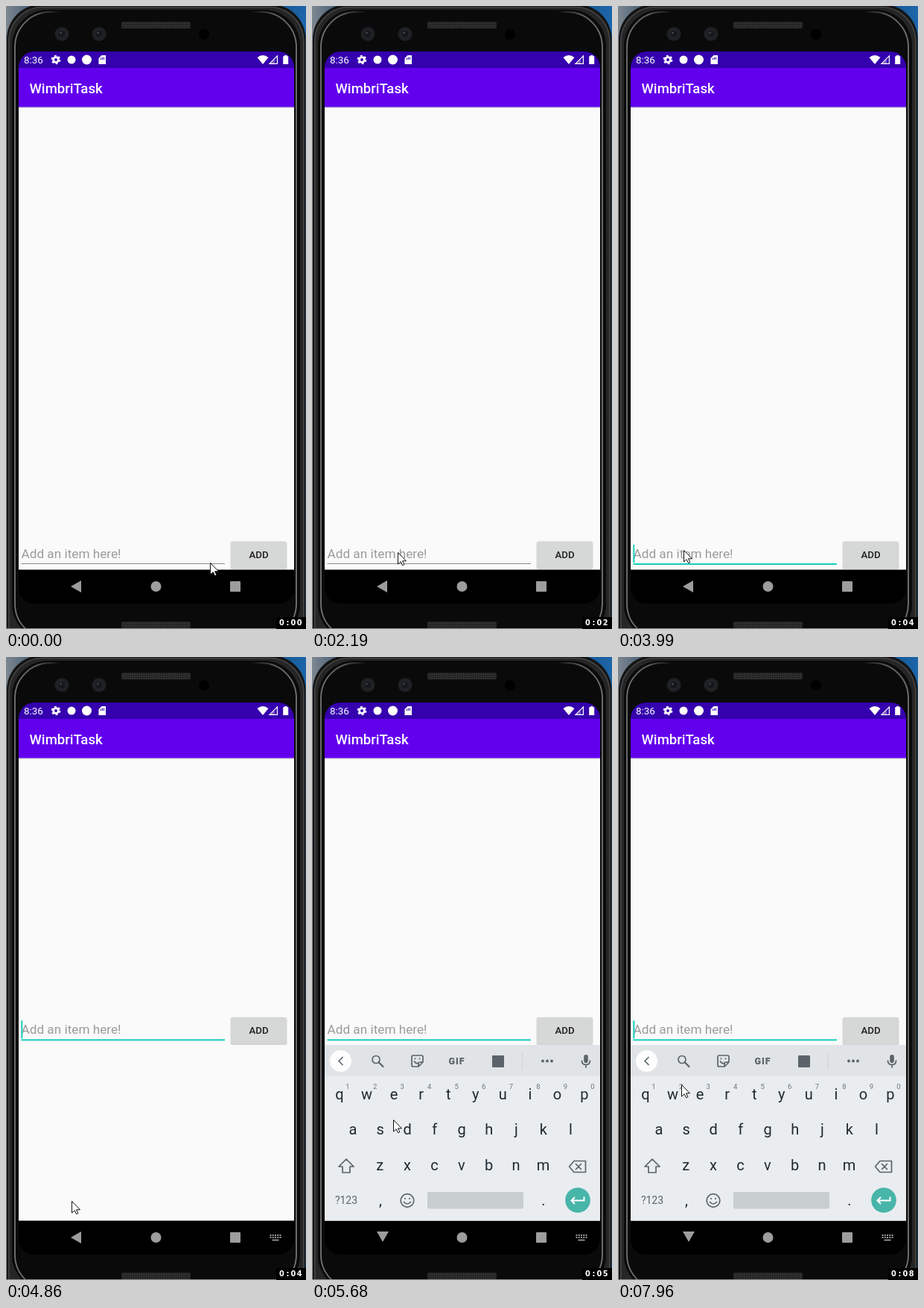
Write an HTML page that moves like this. It is 403 by 835 pixels and loops after 8 s.

```html
<!DOCTYPE html>
<html lang="en">
<head>
<meta charset="utf-8">
<title>Task list demo</title>
<style>
  html, body { margin: 0; width: 100%; height: 100%; overflow: hidden; background: #111; }
  svg { display: block; width: 100%; height: 100%; }
  text { font-family: Roboto, sans-serif; white-space: pre; }
  .mid { text-anchor: middle; }
  .line { fill: none; stroke: #5b6469; stroke-width: 1.7; stroke-linecap: round; stroke-linejoin: round; }
</style>
</head>
<body>
<svg viewBox="0 0 403 835">
  <defs>
    <linearGradient id="desk"><stop offset="0" stop-color="#7d8790"/><stop offset=".08" stop-color="#4a6078"/><stop offset=".9" stop-color="#17558f"/><stop offset="1" stop-color="#1d66aa"/></linearGradient>
    <linearGradient id="shine"><stop offset="0" stop-color="#747474"/><stop offset=".08" stop-color="#5a5a5a"/><stop offset=".16" stop-color="#0a0a0a"/><stop offset=".84" stop-color="#0a0a0a"/><stop offset=".92" stop-color="#5a5a5a"/><stop offset="1" stop-color="#747474"/></linearGradient>
    <pattern id="mesh" width="3" height="3" patternUnits="userSpaceOnUse"><rect width="3" height="3" fill="#303030"/><rect width="1.5" height="1.5" fill="#161616"/></pattern>
    <clipPath id="glass"><rect x="17" y="61" width="370" height="740" rx="21"/></clipPath>
  </defs>

  <!-- Phone body -->
  <rect width="403" height="835" fill="url(#desk)"/>
  <rect x="1" y="-2" width="401.500" height="900" rx="46" fill="#141414"/>
  <rect x="3.800" y="1.500" width="396" height="895" rx="46" fill="#262626" stroke="#464646" stroke-width="1.600"/>
  <rect x="8" y="5" width="387" height="845" rx="48" fill="#0a0a0a"/>
  <rect x="12" y="8" width="378" height="840" rx="47" fill="#0a0a0a" stroke="url(#shine)" stroke-width="1.800"/>
  <path d="M0 834.500h403" stroke="#8c8c8c"/>
  <rect x="155" y="21" width="93" height="9" rx="2" fill="url(#mesh)"/>
  <rect x="155" y="825" width="93" height="9" rx="2" fill="url(#mesh)"/>
  <g id="lenses"></g>
  <circle cx="266" cy="38" r="7" fill="#000"/>

  <!-- Screen -->
  <g clip-path="url(#glass)">
    <rect x="17" y="61" width="370" height="740"/>
    <rect x="17" y="61" width="370" height="22" fill="#3500ae"/>
    <rect x="17" y="83" width="370" height="53" fill="#6200ee"/>
    <rect x="17" y="135.500" width="370" height="620" fill="#fafafa"/>
    <path d="M17 136.300h370" stroke="#000" stroke-width="1.400" opacity=".12"/>
  </g>
  <g fill="#fff">
    <text x="24" y="77" font-size="13.4">8:36</text>
    <circle cx="67" cy="72" r="3.4" fill="none" stroke="#fff" stroke-width="2.8"/>
    <circle cx="67" cy="72" r="5.4" fill="none" stroke="#fff" stroke-width="1.8" stroke-dasharray="2.83 2.83"/>
    <circle cx="88" cy="72" r="5.5"/>
    <circle cx="108.500" cy="72" r="6.500"/>
    <path d="M128.500 66H134v12h-9.500V70z"/>
    <path d="M127.500 69.500v2.500M129.500 68.500v3.500M131.500 68.500v3.500" stroke="#3500ae"/>
    <path d="M337.500 69q7.500-6 15 0L345 78z"/>
    <path d="M364.400 66.900V77.400H354z" fill="none" stroke="#fff" stroke-width="1.2"/>
    <path d="M361 71v7h-6.500z" opacity=".35"/>
    <path d="M374 66h3.500v1.200h1.700V78h-7V67.200h1.800z"/>
    <text x="31.500" y="117" font-size="18.600" font-weight="500">WimbriTask</text>
  </g>

  <!-- Entry row -->
  <g id="entry">
    <text x="20.500" y="740" font-size="17.200" fill="#9b9b9b">Add an item here!</text>
    <rect id="rule" x="20.500" y="747" width="273.500"/>
    <rect id="caret" x="20.300" y="722" width="2" height="24" fill="#18cdbb"/>
    <rect x="301.500" y="718.500" width="76" height="36.200" rx="2" fill="#c4c4c4" opacity=".7"/>
    <rect x="302" y="717.500" width="75" height="36" rx="2" fill="#d6d7d7"/>
    <text class="mid" x="339.500" y="740" font-size="13.300" font-weight="500" fill="#202020">ADD</text>
  </g>

  <!-- Keyboard -->
  <g id="board">
    <rect x="17" y="520" width="370" height="235.500" fill="#e9edf0"/>
    <rect x="17" y="520" width="370" height="42" fill="#e0e4e7"/>
    <circle cx="38.500" cy="541.500" r="14.500" fill="#fdfdfd"/>
    <g class="line">
      <path d="M41 536.500l-5 5 5 5"/>
      <circle cx="86" cy="539.500" r="5"/><path d="M90 543.500l5.500 5.500" stroke-width="2.200"/>
      <path d="M136 534h11q2 0 2 2v7l-6 6h-7q-2 0-2-2v-11q0-2 2-2zM148.500 543h-3.500q-2 0-2 2v3.500M137.500 542q2 3.500 5 2.500M138.500 538v.6M144.500 538v.6"/>
      <path d="M282.500 531v21" stroke="#cdd2d5" stroke-width="1"/>
      <path d="M362.500 541q0 5.500 5.500 5.500t5.500-5.500M368 547v3"/>
      <path d="M46 673l-10 10h5v8h10v-8h5z"/>
      <path d="M352 675.500h15.500v15H352l-6.500-7.500zM354.500 679.500l7 7M361.500 679.500l-7 7"/>
      <circle cx="128" cy="728.500" r="8.800"/><path d="M123.500 730.500q4.500 5 9 0M125 725.500v.7M131 725.500v.7"/>
    </g>
    <g fill="#5b6469">
      <rect x="365.200" y="533" width="5.600" height="11" rx="2.800"/>
      <rect x="242" y="534" width="16" height="16" rx="1"/>
      <circle cx="310" cy="541.500" r="1.900"/><circle cx="316" cy="541.500" r="1.900"/><circle cx="322" cy="541.500" r="1.900"/>
      <text class="mid" x="194.500" y="546" font-size="12.500" font-weight="900" letter-spacing="1">GIF</text>
      <text class="mid" x="46" y="733" font-size="14">?123</text>
    </g>
    <rect x="155" y="717" width="129" height="22.500" rx="2" fill="#c8cdd0"/>
    <circle cx="357" cy="728" r="16.800" fill="#48b5a9"/>
    <path d="M365.500 723.500v5H349M353 724l-4.500 4.500 4.500 4.500" fill="none" stroke="#fff" stroke-width="2"/>
    <g id="keys" class="mid" fill="#1f2a30" font-size="20"></g>
  </g>

  <!-- Navigation -->
  <g fill="#9d9d9d">
    <path id="back"/>
    <circle cx="201.500" cy="778" r="7"/>
    <rect x="301" y="771" width="14" height="14" rx="1"/>
    <g id="switcher">
      <path d="M354.500 775h15M354.500 778h15" fill="none" stroke="#9d9d9d" stroke-width="1.800" stroke-dasharray="2 1.250"/>
      <path d="M357.500 781.500h9" stroke="#9d9d9d" stroke-width="1.800"/>
    </g>
  </g>

  <rect x="363" y="819" width="40" height="16"/>
  <text id="clock" x="367 376.500 382.500 390.800" y="830" font-size="9.800" font-weight="700" fill="#fff" style="font-family:'DejaVu Sans',sans-serif"></text>
  <path id="mouse" d="M.5.5v15.500l3.600-3.300 2.500 5 2.300-1.100-2.400-4.800h5z" fill="#fff" stroke="#111" stroke-width="1"/>
</svg>
<script>
const LOOP = 8000;
const $ = id => document.getElementById(id);

function add(parent, tag, attrs, text = "") {
  const el = document.createElementNS("http://www.w3.org/2000/svg", tag);
  for (const k in attrs) el.setAttribute(k, attrs[k]);
  el.textContent = text;
  parent.append(el);
}

for (const x of [75, 125]) {
  add($("lenses"), "circle", { cx: x, cy: 37.5, r: 9.5, fill: "#1e2023" });
  add($("lenses"), "circle", { cx: x, cy: 37.5, r: 5.5, fill: "#15181c", stroke: "#282c30" });
  add($("lenses"), "circle", { cx: x - 1.5, cy: 36, r: 1.3, fill: "#444b52" });
}

const rows = [["qwertyuiop", 37, 593], ["asdfghjkl", 55, 640], ["zxcvbnm", 91.3, 688]];
for (const [letters, left, y] of rows) {
  [...letters].forEach((c, i) => add($("keys"), "text", { x: left + i * 36.55, y }, c));
}
for (let i = 0; i < 10; i++) {
  add($("keys"), "text", { x: 48 + i * 36.55, y: 578.5, "font-size": 9.5, fill: "#6b747a" }, (i + 1) % 10);
}
add($("keys"), "text", { x: 92, y: 735 }, ",");
add($("keys"), "text", { x: 311, y: 735 }, ".");

// [time, x, y]
const path = [
  [0, 274, 746], [970, 273, 738], [1090, 269, 725], [1240, 161, 194], [1390, 145, 200],
  [1540, 168, 520], [1660, 196, 762], [1810, 164, 753], [1930, 142, 746], [2040, 133, 743],
  [2190, 115, 732], [2310, 110, 731], [2430, 106, 731], [2590, 103, 731], [2730, 99, 730],
  [2840, 95, 729], [2950, 92, 728], [3070, 89, 728], [3190, 88, 729], [5410, 98, 718],
  [5530, 106, 708], [5680, 109, 620], [5830, 85, 573]
];
const blink = [
  [0, 0], [3750, 1], [4980, 0], [5410, 1], [5680, 0], [5950, 1],
  [6380, 0], [6840, 1], [7280, 0], [7800, 1]
];
const ticks = [0, 970, 2040, 2950, 3990, 4980, 5950, 6960, 7960].map((t, i) => [t, i]);

const at = (steps, t) => steps.findLast(s => s[0] <= t);
const show = (id, on) => $(id).setAttribute("visibility", on ? "visible" : "hidden");

function draw(now) {
  const t = now % LOOP;
  const [, x, y] = at(path, t);
  const focus = t >= 3750, raised = t >= 4860;
  $("mouse").setAttribute("transform", `translate(${x} ${y})`);
  $("entry").setAttribute("transform", `translate(0 ${raised ? -234.7 : 0})`);
  $("rule").setAttribute("height", focus ? 2 : 1);
  $("rule").setAttribute("fill", focus ? "#18cdbb" : "#8c8c8c");
  $("back").setAttribute("d", t >= 5410 ? "M87 770h16l-8 14z" : "M87 778l14-8v16z");
  $("clock").textContent = "0:0" + at(ticks, t)[1];
  show("caret", at(blink, t)[1]);
  show("switcher", raised);
  show("board", t >= 5680);
}

function frame() {
  draw(performance.now());
  requestAnimationFrame(frame);
}
frame();
</script>
</body>
</html>
```
